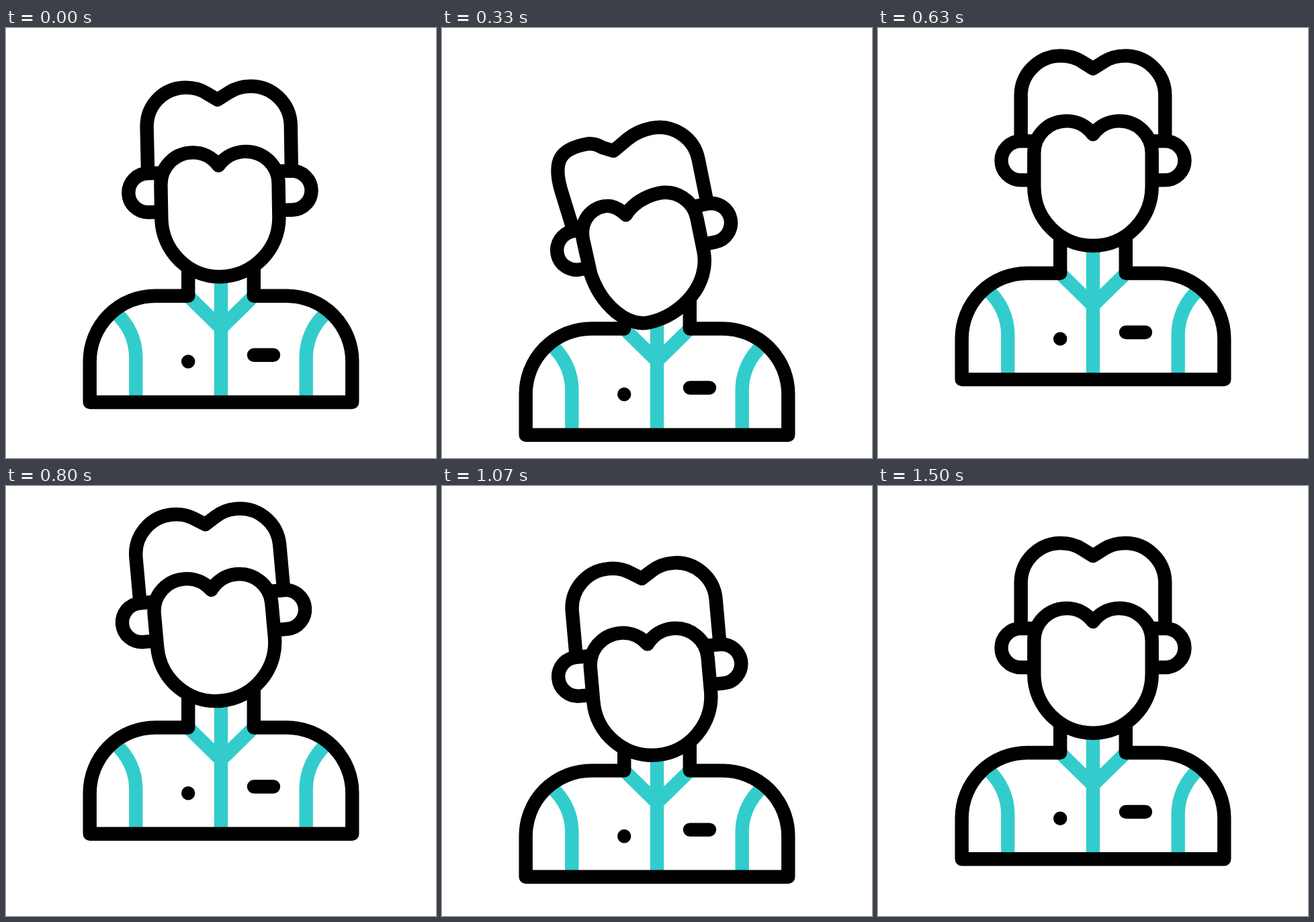
Recreate the animation shown at these times as an HTML page. Size 640x640 px, loop 1.67 s.

```html
<!DOCTYPE html>
<html lang="en">
<head>
<meta charset="utf-8">
<title>Nodding figure</title>
<style>
  html, body { margin: 0; height: 100%; overflow: hidden; background: #fff; }
  svg { display: block; width: 100vw; height: 100vh; }
  path { fill: none; stroke: #000; stroke-width: 20.4; stroke-linejoin: round; }
  .teal { stroke: #33cccc; stroke-linejoin: miter; }
</style>
</head>
<body>
<svg viewBox="0 0 640 640">
  <g id="body">
    <path class="teal" d="M320 335V555M271 397L320 445L369 397M163 422A88 88 0 0 1 193.3 488V555M477 422A88 88 0 0 0 446.7 488V555"/>
    <path d="M271.2 335V397H222A97.3 97.3 0 0 0 124.7 494.3V555.2H515.3V494.3A97.3 97.3 0 0 0 418 397H368.8V335"/>
    <path stroke-linecap="round" d="M271.2 494.7h.01M369 485H398"/>
  </g>
  <g id="head">
    <path id="leftEar" d="M236 212H212.5A29 29 0 0 0 212.5 270H236"/>
    <path d="M404 212H427.5A29 29 0 0 1 427.5 270H404"/>
    <path id="hair"/>
    <path id="face" style="fill:#fff"/>
  </g>
</svg>
<script>
const LOOP = 1670, STEP = 100 / 3, LAST = 45;
const $ = id => document.getElementById(id);

// [time in ms, value] pairs, eased between neighbours
const bodyY = [[-45, 0], [357, 51], [720, -46], [1100, 28.2], [1475, 0]];
const headY = [[-45, 0], [348, 68.3], [717, -60.5], [1078, 33], [1483, 0]];
const tilt = [[-70, 0], [335, -11.5], [485, 7.8], [630, 0], [930, -8.6], [1240, 0]];
const turn = [[-70, 0], [340, 1], [520, 0]];

function valueAt(keys, t) {
  const i = keys.findIndex(key => key[0] > t);
  if (i < 0) return keys[keys.length - 1][1];
  const [t0, a] = keys[i - 1], [t1, b] = keys[i];
  const u = (t - t0) / (t1 - t0);
  return a + (b - a) * u * u * (3 - 2 * u);
}

// m = 0 faces the viewer, m = 1 is turned to the left
const hairPath = m => `M${212.7 + 11 * m} ${212 - 4 * m}
  L${212.7 + 5 * m} ${144 + 3 * m}
  C${212.7 + 2 * m} ${111.4 - 9 * m} ${239.4 - 10 * m} ${85 + 3 * m} ${272 - 2 * m} ${85 + 4 * m}
  C${284 - 4 * m} ${85 + 5 * m} ${295 - 10 * m} ${88 + 6 * m} ${304 - 13 * m} ${94 + 5 * m}
  L${320 - 14 * m} ${104 + 3 * m} L${336 - 6 * m} 94
  C${345 - 4 * m} 88 356 85 368 85
  A59.3 59.3 0 0 1 427.3 144V212`;

const facePath = m => `M${232.3 + 4 * m} 280L${232.3 + 3 * m} 230
  C${232.3 + 2 * m} 203 ${254 - 2 * m} ${182 + 3 * m} ${281 - 5 * m} ${182 + 3 * m}
  C${297 - 8 * m} ${182 + 3 * m} ${311 - 13 * m} ${190 + 4 * m} ${320 - 15 * m} ${202 + 2 * m}
  C${329 - 13 * m} ${190 + 2 * m} ${343 - 6 * m} 182 359 182
  C386 182 407.7 203 407.7 230V280
  C407.7 328.4 ${368.4 - 10 * m} 367.7 ${320 - 14 * m} 367.7
  C${271.6 + 2 * m} 367.7 ${232.3 + 10 * m} 328.4 ${232.3 + 4 * m} 280Z`;

function draw(now) {
  const t = STEP * Math.min(LAST, Math.floor((now % LOOP + 3.4) / STEP));
  const m = valueAt(turn, t);
  $('body').setAttribute('transform', `translate(0 ${valueAt(bodyY, t)})`);
  $('head').setAttribute('transform',
    `translate(0 ${valueAt(headY, t)}) rotate(${valueAt(tilt, t)} 320 363)`);
  $('leftEar').setAttribute('transform', `translate(${10 * m} 0)`);
  $('hair').setAttribute('d', hairPath(m));
  $('face').setAttribute('d', facePath(m));
}

const start = performance.now();
function loop() {
  draw(performance.now() - start);
  requestAnimationFrame(loop);
}
loop();
</script>
</body>
</html>
```
